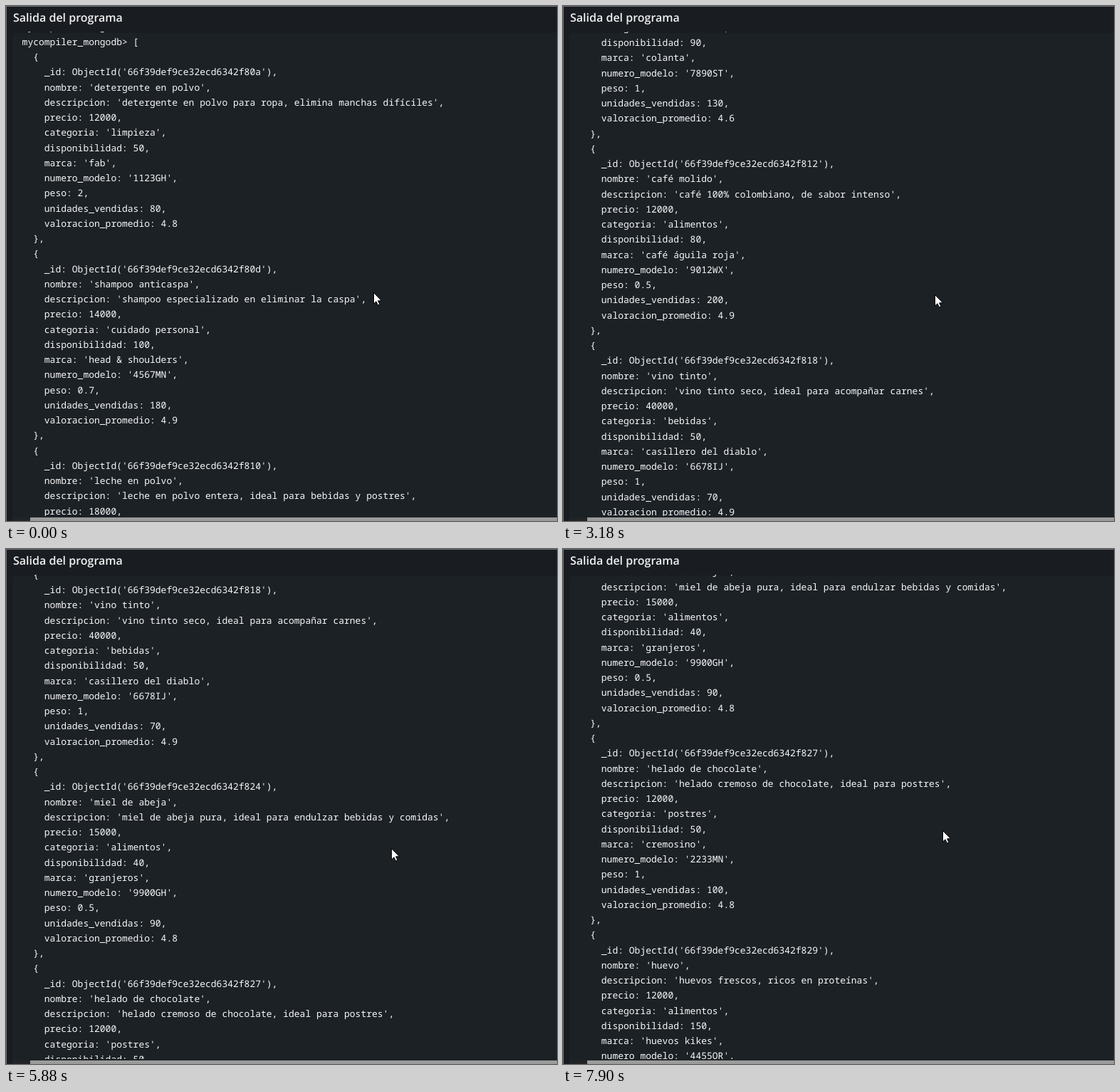
An HTML page for the animation above (8 s loop, 774 by 723 pixels).

```html
<!DOCTYPE html>
<html lang="es">
<head>
<meta charset="utf-8">
<title>Salida del programa</title>
<style>
  html, body { margin: 0; width: 100%; height: 100%; overflow: hidden; background: #191c20; }
  svg { display: block; width: 774px; height: 723px; }
  text { fill: #f8f9fa; text-rendering: geometricPrecision; }
  .title { font: 600 16px "Open Sans", "Noto Sans", sans-serif; fill: #f0f1f2; }
  #log { font: 13px "Noto Sans Mono", "DejaVu Sans Mono", monospace; }
</style>
</head>
<body>
<svg viewBox="0 0 774 723">
  <defs><clipPath id="view"><rect y="36" width="774" height="680"/></clipPath></defs>
  <rect width="774" height="723" fill="#191c20"/>
  <path d="M9 723V42Q9 38 13 38H774V723Z" fill="#1c2125"/>
  <path d="M0 .5H774M.5 0V723" stroke="#6f7275"/>
  <text class="title" x="10" y="22">Salida del programa</text>
  <g id="log" clip-path="url(#view)"></g>
  <rect x="9" y="718" width="765" height="5" fill="#212427"/>
  <rect x="34" y="718" width="740" height="5" fill="#9b9b9b"/>
  <path id="cursor" d="M.5 .5V16L4 12.8L6.5 18L9 17L6.6 11.8H11.5Z" fill="#fff" stroke="#000"/>
</svg>
<script>
const LOOP = 8000, PITCH = 21.25, CHAR = 7.8, LEFT = 22.6, TICK = 127;
const KEYS = ['_id', 'nombre', 'descripcion', 'precio', 'categoria', 'disponibilidad',
  'marca', 'numero_modelo', 'peso', 'unidades_vendidas', 'valoracion_promedio'];
const QUOTED = new Set(['nombre', 'descripcion', 'categoria', 'marca', 'numero_modelo']);

const ITEMS = `
80a|detergente en polvo|detergente en polvo para ropa, elimina manchas difíciles|12000|limpieza|50|fab|1123GH|2|80|4.8
80d|shampoo anticaspa|shampoo especializado en eliminar la caspa|14000|cuidado personal|100|head & shoulders|4567MN|0.7|180|4.9
810|leche en polvo|leche en polvo entera, ideal para bebidas y postres|18000|alimentos|90|colanta|7890ST|1|130|4.6
812|café molido|café 100% colombiano, de sabor intenso|12000|alimentos|80|café águila roja|9012WX|0.5|200|4.9
818|vino tinto|vino tinto seco, ideal para acompañar carnes|40000|bebidas|50|casillero del diablo|6678IJ|1|70|4.9
824|miel de abeja|miel de abeja pura, ideal para endulzar bebidas y comidas|15000|alimentos|40|granjeros|9900GH|0.5|90|4.8
827|helado de chocolate|helado cremoso de chocolate, ideal para postres|12000|postres|50|cremosino|2233MN|1|100|4.8
829|huevo|huevos frescos, ricos en proteínas|12000|alimentos|150|huevos kikes|4455QR
`.trim().split('\n').map(row => row.split('|'));

// spans of time in which the picture refreshes, about every TICK ms
const ACTIVE = [[120, 380], [780, 900], [1430, 1560], [1820, 2100], [2240, 2620],
  [3040, 3180], [4230, 5490], [5740, 6890], [7400, 7900]];

// time, scroll offset
const SCROLL = [[0, 0], [380, 200], [900, 200], [1430, 207], [1560, 325], [1820, 338],
  [2100, 450], [2240, 452], [2620, 575], [3040, 680], [3180, 700], [4230, 720],
  [5110, 1050.5], [5240, 1075], [5740, 1085], [5990, 1200], [6250, 1200], [6370, 1211.5],
  [6630, 1325], [7400, 1340], [7650, 1450], [7770, 1450], [7900, 1463.5]];

// time, x, y
const POINTER = [[0, 516, 402], [380, 516, 402], [900, 522, 405], [4230, 522, 405],
  [5110, 538, 425], [6370, 543, 417], [7900, 533, 395]];

const times = [0];
for (const [from, to] of ACTIVE) {
  const n = Math.round((to - from) / TICK);
  for (let i = 0; i <= n; i++) {
    times.push(Math.floor((from + (to - from) * i / n) / 10) * 10);
  }
}

function sample(track, t, k) {
  const i = track.findIndex(p => p[0] >= t);
  if (i < 0) return track.at(-1)[k];
  if (track[i][0] === t) return track[i][k];
  const a = track[i - 1], b = track[i];
  return a[k] + (b[k] - a[k]) * (t - a[0]) / (b[0] - a[0]);
}

const log = document.getElementById('log');
const cursor = document.getElementById('cursor');
const lines = [];

function addLine(indent, content) {
  const el = document.createElementNS('http://www.w3.org/2000/svg', 'text');
  el.setAttribute('x', LEFT + indent * CHAR);
  el.textContent = content;
  log.append(el);
  lines.push(el);
}

function format(key, value) {
  if (key === '_id') return `ObjectId('66f39def9ce32ecd6342f${value}')`;
  return QUOTED.has(key) ? `'${value}'` : value;
}

addLine(0, 'mycompiler_mongodb>');
addLine(0, 'mycompiler_mongodb> [');
for (const item of ITEMS) {
  addLine(2, '{');
  item.forEach((value, k) => {
    const comma = k < KEYS.length - 1 ? ',' : '';
    addLine(4, `${KEYS[k]}: ${format(KEYS[k], value)}${comma}`);
  });
  addLine(2, '},');
}

let shown = -1;

function show(t) {
  if (t === shown) return;
  shown = t;
  const scroll = sample(SCROLL, t, 1);
  lines.forEach((el, n) => {
    const base = 55 + Math.floor(PITCH * (n - 1) + 0.25 - scroll);
    el.setAttribute('y', base);
    el.style.display = base > 20 && base < 740 ? '' : 'none';
  });
  const x = Math.round(sample(POINTER, t, 1)), y = Math.round(sample(POINTER, t, 2));
  cursor.setAttribute('transform', `translate(${x} ${y})`);
}

const start = performance.now();
function tick() {
  const now = Math.max(0, performance.now() - start) % LOOP;
  show(times.findLast(t => t <= now));
  requestAnimationFrame(tick);
}
tick();
</script>
</body>
</html>
```
